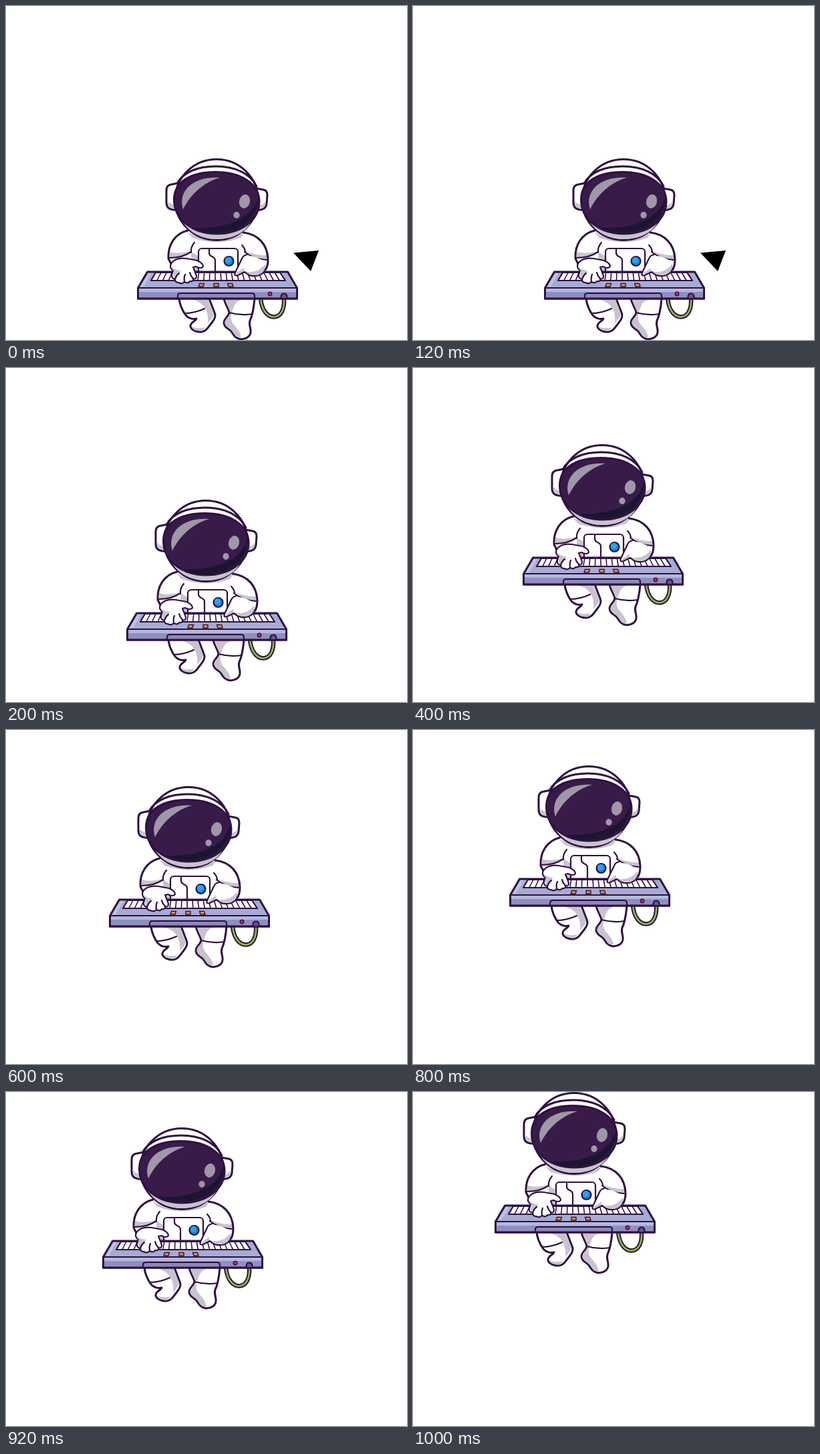
An HTML page that plays this animation: 600 by 500 pixels, repeating every 1.2 s.

```html
<!DOCTYPE html>
<html lang="en">
<head>
<meta charset="utf-8">
<title>Floating keyboardist</title>
<style>
  html, body { margin: 0; width: 100%; height: 100%; overflow: hidden; background: #fff; }
  svg { display: block; width: 100vw; height: 100vh; }
  .o, .t { stroke: #2f1142; stroke-width: 3; stroke-linejoin: round; stroke-linecap: round; }
  .t { stroke-width: 2.2; }
  .w { fill: #fff; }
  .s { fill: #c9c3ce; }
  .n { fill: none; }
  .g { fill: #a097a9; }
</style>
</head>
<body>
<svg viewBox="0 0 600 500" preserveAspectRatio="none">
  <path id="wedge" d="M430 369.5 L468 366 L456 397 Z"/>
  <g id="player">
    <!-- legs -->
    <path class="o w" d="M259 438 C260 447 264 456 269 463 Q276 470 285 468 C284 472 275 473 276 480 C278 486 286 488 292 488 C300 487 303 480 308 474 C313 468 314 463 312 459 L304 438"/>
    <path class="s" d="M279 439 H302.500 L310.500 459 C312 465 306 470 302 475 C303 464 301 456 297 451 C292 443 285 442 279 439 Z"/>
    <path class="s" d="M277.500 480 Q287 484 298 481 Q295 487 290 486.500 Q280 486 277.500 480 Z"/>
    <path class="t n" d="M267 460 Q282 460 297 453"/>
    <path class="o w" d="M326 438 C328 447 333 453 334 459 C333 465 326 468 326 474 C326 480 332 483 336 486 C340 490 341 497 350 498.500 C358 499.500 367 495 366 486 C366 481 363 477 365 471 C369 463 371 449 372 438"/>
    <path class="s" d="M328 439.500 H352 Q343 443 341 450 C337 460 334 468 340 476 C344 481 350 486 352 496 C344 498 341 490 338 486 C334 482 327.500 480 327.500 474 C328 467 335 466 335.500 459 C334 452 330 448 328 439.500 Z"/>
    <path class="t n" d="M334 459 Q352 464 369 461"/>

    <!-- torso and arms -->
    <path class="w" d="M272 336 C252 341 242 358 243 378 L256 403 H376 L392 379 C391 357 378 342 355 339 Z"/>
    <path class="s" d="M271 338 Q313 362 357 339 L351 347 Q316 360 279 347 Z"/>
    <path class="s" d="M245 368 Q258 372 276 367 Q264 377 245 377 Z M360 367 Q375 374 390 373 L390 380 Q371 378 360 367 Z M277 368 L287 374 V400 H278 Z"/>
    <path class="o n" d="M272 336 C252 341 242 358 243 378 L247 386 M355 339 C378 342 391 357 392 379 Q392 388 389 394"/>
    <path class="t n" d="M245 377 Q264 377 277 368 M282 354 Q276 361 277 369 M357 368 Q371 379 390 380 M353 358 Q358 363 358 369"/>
    <rect class="t w" x="288" y="363" width="59" height="44" rx="5"/>
    <path class="t n" d="M304 364 V370 Q304 373 308 375 Q313 377 313 381 V400"/>
    <circle class="t" cx="333.500" cy="382" r="7" fill="#1680d5"/>
    <circle cx="332.500" cy="380.500" r="4.500" fill="#25a6f2"/>

    <!-- cable -->
    <g class="n">
      <path stroke="#2f1142" stroke-width="6.500" d="M381 438 C383 457 392 465.500 401 465.500 C412 465 417 453 416 438"/>
      <path stroke="#87bc43" stroke-width="2.600" d="M381 438 C383 457 392 465.500 401 465.500 C412 465 417 453 416 438"/>
    </g>

    <!-- keyboard -->
    <path class="o" fill="#a7abd3" d="M211.500 398 H421.500 L435.500 422 V438 H197.500 V422 Z"/>
    <path fill="#bfc3e2" d="M213 400 H218 L206 420 H201 Z"/>
    <path fill="#8e8fc0" d="M199 423 H434 V436.500 H199 Z"/>
    <path fill="#b4b8dc" d="M199 423 H434 V428 H199 Z"/>
    <path class="t n" d="M198 422 H435"/>
    <path class="t w" d="M224 399 H410 L418 411 H217 Z"/>
    <g id="keys"></g>
    <path class="t" fill="#8a89b9" d="M257 438 V434 Q257 430 261 430 H368 Q372 430 372 434 V438"/>
    <path class="o n" d="M197.500 438 H435.500"/>
    <g id="pads"></g>
    <circle class="t" cx="395" cy="431" r="2.700" fill="#e52b50" style="stroke-width:1.500"/>
    <path class="t" fill="#655492" d="M411.500 438 V435 Q412 430.500 416 430.500 Q420 430.500 420.500 435 V438 Z"/>

    <!-- hands -->
    <path class="t w" d="M248 384 Q255 376 270 378 L286 381 Q295 385 295 390 Q292 394 284 390 L280 391 Q283 398 285 404 Q285 410 280 408 Q281 413 275 412 Q273 416 267 413 Q263 417 258 414 Q253 414 253 409 Q247 408 248 402 L250 396 Q243 391 248 384 Z"/>
    <path class="s" d="M247 389 Q252 396 262 396 Q257 400 254 408 Q249 406 250 401 L251 396 Q247 393 247 389 Z"/>
    <path class="t n" d="M253 409 Q255 403 259 400 M267 413 Q266 406 268 402 M280 408 Q276 404 275 399"/>
    <path class="w" d="M355 375 Q372 371 388 384 Q391 397 379 403 Q366 407 357 398 L347 403 Q341 404 343 399 Z"/>
    <path class="s" d="M357 397 Q376 402 388 386 Q390 397 378 402 Q366 405 357 397 Z M344.500 400 L356 392 V397 L346 402 Z"/>
    <path class="t n" d="M361 372 Q355 373 353 378 L343 399 Q341 405 347 403 L357 398 Q366 407 379 403 Q387 400 389 392"/>

    <!-- helmet -->
    <path class="o w" d="M258 265 L248 267 Q240 268 240 276 V294 Q240 304 250 305 L260 306 Z"/>
    <path class="s" d="M241.500 291 Q246 299 257 297 V304 L250 303.500 Q242 302 241.500 291 Z"/>
    <path class="o w" d="M374 273 L385 275 Q391 276 391 283 L390 296 Q389 304 381 305 L373 306 Z"/>
    <path class="s" d="M379 299 Q386 298 389 290 L388.500 296 Q387 302 380 303.500 H376 Z"/>
    <ellipse class="o w" cx="315" cy="290" rx="62" ry="60.500"/>
    <path class="s" d="M262 318 Q281 342 316 342 Q354 342 371 312 C365 338 340 349 316 349 C291 349 271 338 262 318 Z"/>
    <path class="o n" d="M256 266 C265 248 288 240 314 240 C343 240 366 251 375 270"/>
    <path class="o" fill="#391b49" d="M251.500 290 C251.500 263 277 248.500 313 248.500 C352 248.500 379 266 379 293 C379 321 351 341 315 341 C279 341 251.500 319 251.500 290 Z"/>
    <path fill="#1b1630" d="M377.500 284 C380 320 347 339.500 315 339.500 C302 339.500 290 337 281 332 C330 334 372 318 377.500 284 Z"/>
    <path class="g" d="M265 304.500 C256 276 282 254 320 257 C298 263 277 280 265 304.500 Z"/>
    <ellipse class="g" cx="357" cy="292.500" rx="8" ry="10.500" transform="rotate(14 357 292.500)"/>
    <ellipse class="g" cx="345" cy="313" rx="4.600" ry="5"/>
  </g>
</svg>
<script>
  const $ = id => document.getElementById(id);
  const LOOP = 1200;
  const INK = '#2f1142';

  function add(parent, d, attrs) {
    const p = document.createElementNS('http://www.w3.org/2000/svg', 'path');
    p.setAttribute('d', d);
    for (const k in attrs) p.setAttribute(k, attrs[k]);
    parent.append(p);
  }

  const KEYS = 23;
  for (let i = 1; i < KEYS; i++) {
    const u = i / KEYS;
    add($('keys'), `M${224 + 186 * u} 399 L${217 + 201 * u} 411`, { stroke: INK, 'stroke-width': 1.6 });
  }

  [[292, -1], [314.5, 0], [336, 1]].forEach(([x, lean]) =>
    add($('pads'), `M${x - 3.5 - lean} 415.5 h7 l${lean * 1.5} 4.5 h-7 Z`,
      { fill: '#f39a24', stroke: INK, 'stroke-width': 1.4 }));

  const hops = [[0, 0], [-16, -31], [-32, -114], [-42, -144], [-52, -175], [-74, -228]];

  function play(el, frames) {
    frames.forEach((f, i) => { f.offset = i / hops.length; f.easing = 'step-end'; });
    frames.push({ ...frames[frames.length - 1], offset: 1 });
    el.animate(frames, { duration: LOOP, iterations: Infinity });
  }

  play($('player'), hops.map(([x, y]) => ({ transform: `translate(${x}px, ${y}px)` })));
  play($('wedge'), hops.map((_, i) => ({ opacity: i ? 0 : 1 })));
</script>
</body>
</html>
```
